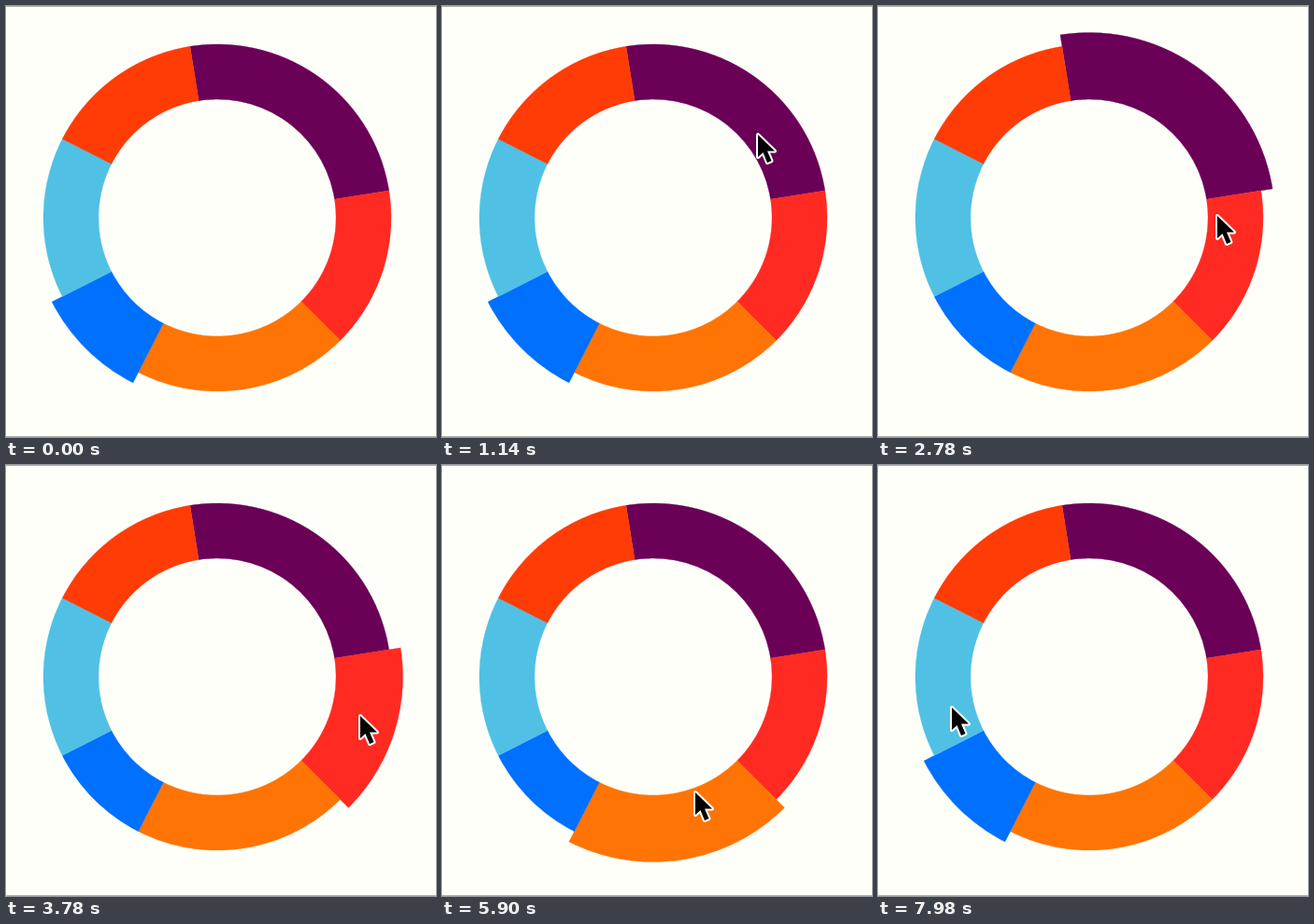
Animation, 460 px wide and 462 px high, one loop 8000 ms. Source, as a matplotlib script:

```python
import numpy as np
import matplotlib.pyplot as plt
from matplotlib.animation import FuncAnimation
from matplotlib.patches import Polygon, Rectangle, Wedge

W, H, DPI = 460, 462, 64  # power of two keeps the pixel size exact
STEP, LOOP = 20, 8000
PX = 72 / DPI  # points per pixel

CENTER, INNER, OUTER, RAISED = (226, 227), 127, 186, 198.5
# share of the ring in percent and colour, clockwise from START degrees
START = -99
SLICES = [(25, "#6b0057"), (15, "#ff2a22"), (20, "#ff7404"),
          (10, "#0070ff"), (15, "#50c1e4"), (15, "#ff3b06")]
# time in ms and index of the slice selected from then on
SELECTIONS = [(0, 3), (1660, 0), (3780, 1), (5400, 2), (7160, 3)]

# pointer path: time in ms, x, y
PATH = np.array([
    (0, 464, 389), (820, 375, 211), (1140, 337, 135), (1240, 337, 135),
    (1560, 320, 101), (1900, 320, 101), (2500, 343, 158), (2780, 362, 222),
    (3200, 378, 266), (4220, 378, 266), (4600, 291, 328), (5020, 259, 363),
    (5200, 259, 363), (5760, 270, 348), (5960, 270, 348), (6600, 118, 376),
    (6700, 118, 376), (6860, 101, 352), (7159, 101, 352), (7160, 96, 322),
    (7270, 96, 322), (7300, 99, 328), (7580, 99, 328), (7980, 78, 257)])
ARROW = np.array([(1, 3), (1, 27), (6.5, 22), (11, 33),
                  (15.5, 31), (11, 20.5), (19, 20.5)])

fig = plt.figure(figsize=(W / DPI, H / DPI), dpi=DPI, facecolor="#fffffa")
ax = fig.add_axes([0, 0, 1, 1])
ax.set_xlim(0, W)
ax.set_ylim(H, 0)
ax.axis("off")

for y in (0, H - 1):
    ax.add_patch(Rectangle((0, y), W, 1, fc="#b0b0aa", lw=0))

wedges = []
angle = START
for share, color in SLICES:
    sweep = share * 3.6
    wedge = Wedge(CENTER, OUTER, angle, angle + sweep, width=OUTER - INNER,
                  fc=color, ec=color, lw=0.3 * PX)
    wedges.append(ax.add_patch(wedge))
    angle += sweep

halo = ax.add_patch(Polygon(ARROW, fc="white", ec="white", lw=4 * PX,
                            joinstyle="round", zorder=5))
arrow = ax.add_patch(Polygon(ARROW, fc="black", lw=0, zorder=6))


def draw(frame):
    t = frame * STEP
    selected = [index for start, index in SELECTIONS if start <= t][-1]
    for i, wedge in enumerate(wedges):
        radius = RAISED if i == selected else OUTER
        wedge.set_radius(radius)
        wedge.set_width(radius - INNER)
    tip = [np.interp(t, PATH[:, 0], PATH[:, k]) for k in (1, 2)]
    for shape in (halo, arrow):
        shape.set_xy(ARROW + tip)
    return [*wedges, halo, arrow]


anim = FuncAnimation(fig, draw, frames=LOOP // STEP, interval=STEP,
                     repeat=True, repeat_delay=0)
plt.show()
```
